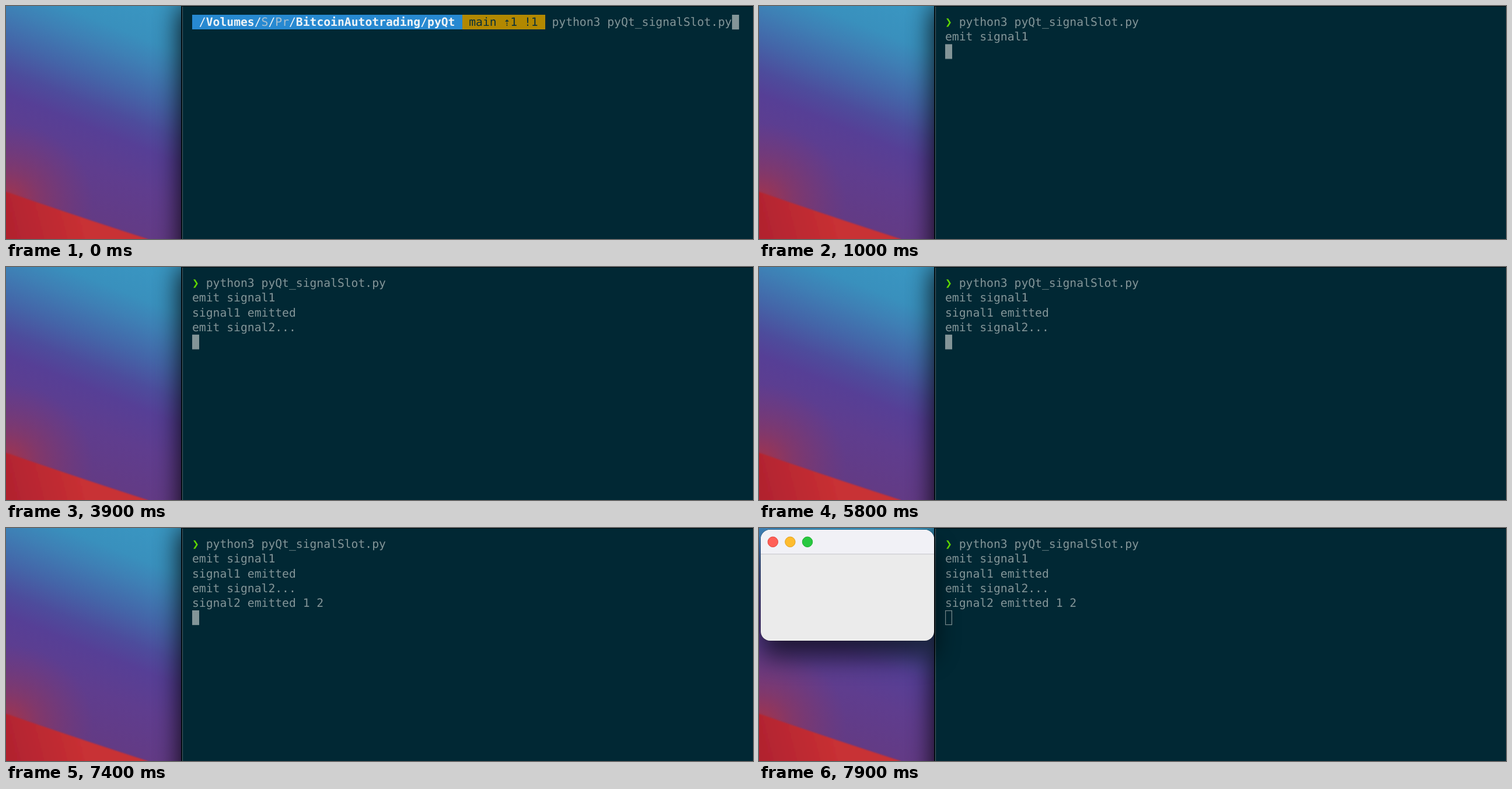
An HTML page that plays this animation: 1280x399 px, repeating every 8.01 s.

```html
<!DOCTYPE html>
<html lang="en">
<head>
<meta charset="utf-8">
<title>Terminal session</title>
<style>
  html, body { margin: 0; width: 100%; height: 100%; overflow: hidden; background: #012834; }
  svg { display: block; width: 100vw; height: 100vh; }
  text {
    font: 19.7px "DejaVu Sans Mono", monospace;
    white-space: pre;
    text-rendering: geometricPrecision;
    fill: #839598;
  }
  .bold { font-weight: 700; }
  .path { fill: #eef3f6; }
  .dim { fill: #a9c0d0; }
  .branch { fill: #08303a; }
  .prompt { fill: #5fd700; font-weight: 700; }
</style>
</head>
<body>
<svg viewBox="0 0 1280 399" preserveAspectRatio="none">
  <defs>
    <linearGradient id="sky" gradientUnits="userSpaceOnUse" x1="41.4" y1="-103.4" x2="-113.8" y2="284.5">
      <stop offset="0" stop-color="#3a98c3"/>
      <stop offset=".18" stop-color="#3990bd"/>
      <stop offset=".27" stop-color="#3e80b5"/>
      <stop offset=".4" stop-color="#4465a8"/>
      <stop offset=".51" stop-color="#4d4c9c"/>
      <stop offset=".6" stop-color="#563f96"/>
      <stop offset=".75" stop-color="#5f3d8e"/>
      <stop offset="1" stop-color="#643a82"/>
    </linearGradient>
    <radialGradient id="glow">
      <stop offset="0" stop-color="#b4323e" stop-opacity=".85"/>
      <stop offset=".4" stop-color="#a4344c" stop-opacity=".45"/>
      <stop offset="1" stop-color="#8c3664" stop-opacity="0"/>
    </radialGradient>
    <linearGradient id="dune" gradientUnits="userSpaceOnUse" x1="0" y1="399" x2="130" y2="365">
      <stop offset="0" stop-color="#b0222f"/>
      <stop offset="1" stop-color="#c83034"/>
    </linearGradient>
    <filter id="soft" x="-20%" y="-20%" width="140%" height="140%"><feGaussianBlur stdDeviation="1.2"/></filter>
    <filter id="blur" filterUnits="userSpaceOnUse" x="-150" y="-150" width="1700" height="800"><feGaussianBlur stdDeviation="22"/></filter>
    <clipPath id="frame"><rect x="3" y="3" width="297" height="190" rx="16"/></clipPath>
    <rect id="terminalShade" x="297" y="0" width="1100" height="600" opacity=".85" filter="url(#blur)"/>
  </defs>

  <rect width="302" height="399" fill="url(#sky)"/>
  <ellipse cx="0" cy="335" rx="150" ry="135" fill="url(#glow)"/>
  <path d="M-20 311L0 318Q110 356 243 399L243 420H-20Z" fill="url(#dune)" filter="url(#soft)"/>
  <use href="#terminalShade"/>
  <rect id="restShadow" x="3" y="18" width="297" height="190" rx="16" opacity=".5" filter="url(#blur)"/>

  <rect x="300" width="980" height="399" fill="#000b10"/>
  <rect x="302" y="1" width="978" height="398" fill="#012834"/>
  <path d="M302.5 399V1" stroke="#4b626a" fill="none"/>

  <g id="shellPrompt">
    <rect x="319" y="15" width="463" height="25" fill="#2789d1"/>
    <rect x="782" y="15" width="142" height="25" fill="#b28800"/>
  </g>
  <g id="lines"></g>
  <rect id="cursor" x="319.6" y="15.6" width="10.8" height="24" fill="#839598" stroke="#839598" stroke-width="1.2"/>

  <rect id="keyShadow" x="3" y="32" width="297" height="190" rx="16" opacity=".65" filter="url(#blur)"/>
  <g id="window">
    <rect x="2.5" y="2.5" width="298" height="191" rx="16.5" fill="#000" opacity=".3"/>
    <g clip-path="url(#frame)">
      <rect width="302" height="200" fill="#ebebeb"/>
      <rect id="titleBar" width="302" height="44.5" fill="#e7e7ec"/>
      <rect y="44" width="302" height="1.2" fill="#cacacf"/>
      <g id="lights"></g>
      <use id="overlap" href="#terminalShade" opacity=".6"/>
    </g>
  </g>
</svg>
<script>
const LOOP = 8010, COLUMN = 11.86, ROW = 25.2;
const byId = id => document.getElementById(id);

function add(parent, tag, attributes, text = '') {
  const node = document.createElementNS('http://www.w3.org/2000/svg', tag);
  for (const [name, value] of Object.entries(attributes)) node.setAttribute(name, value);
  node.textContent = text;
  return parent.appendChild(node);
}

// Each step is [time in ms, value]; a value holds until the next step.
function play(node, property, steps) {
  const frames = steps.map(([time, value]) => ({ offset: time / LOOP, [property]: value, easing: 'step-end' }));
  frames.push({ offset: 1, [property]: steps.at(-1)[1] });
  node.animate(frames, { duration: LOOP, iterations: Infinity });
}
const showFrom = (node, time) => play(node, 'opacity', [[0, 0], [time, 1]]);

// Writes a row from [text, class] runs.
function write(parent, row, runs) {
  const line = add(parent, 'text', { x: 319, y: 34.2 + row * ROW });
  for (const [text, style = ''] of runs) add(line, 'tspan', { class: style }, text);
  return line;
}

const command = 'python3 pyQt_signalSlot.py';
const shell = byId('shellPrompt');
write(shell, 0, [
  [' /', 'path'], ['Volumes', 'path bold'], ['/', 'path'], ['S', 'dim'], ['/', 'path'], ['Pr', 'dim'],
  ['/', 'path'], ['BitcoinAutotrading/pyQt', 'path bold'], [' '],
  [' main ⇡1 !1 ', 'branch'], [' ' + command]
]);
play(shell, 'opacity', [[0, 1], [50, 0]]);

const output = [
  [50, [['❯', 'prompt'], [' ' + command]]],
  [400, [['emit signal1']]],
  [2400, [['signal1 emitted']]],
  [2400, [['emit signal2...']]],
  [7400, [['signal2 emitted 1 2']]]
];
output.forEach(([time, runs], row) => showFrom(write(byId('lines'), row, runs), time));

const cursorStops = [[0, 78, 0], [50, 0, 1], [400, 0, 2], [2400, 0, 4], [7400, 0, 5]];
play(byId('cursor'), 'transform', cursorStops.map(([time, column, row]) =>
  [time, `translate(${column * COLUMN}px, ${row * ROW}px)`]));
play(byId('cursor'), 'fillOpacity', [[0, 1], [7450, 0]]);

[['#ff5f57', '#e0473f'], ['#febc2e', '#dfa023'], ['#28c840', '#1dad2f']].forEach(([color, rim], i) => {
  const light = add(byId('lights'), 'circle', { cx: 23.8 + i * 29.6, cy: 23.8, r: 8.7, 'stroke-width': 1 });
  play(light, 'fill', [[0, '#cfcfd2'], [7750, color]]);
  play(light, 'stroke', [[0, '#b8b8bc'], [7750, rim]]);
});

showFrom(byId('window'), 7450);
play(byId('restShadow'), 'opacity', [[0, 0], [7450, .5], [7750, .35], [7850, .15], [7900, 0]]);
play(byId('keyShadow'), 'opacity', [[0, 0], [7750, .2], [7800, .35], [7850, .5], [7900, .65]]);
play(byId('overlap'), 'opacity', [[0, .6], [7500, 0]]);
play(byId('titleBar'), 'fill', [[0, '#e7e7ec'], [7500, '#ebebf0'], [7550, '#eeeef3'], [7600, '#f1f1f6']]);
</script>
</body>
</html>
```
